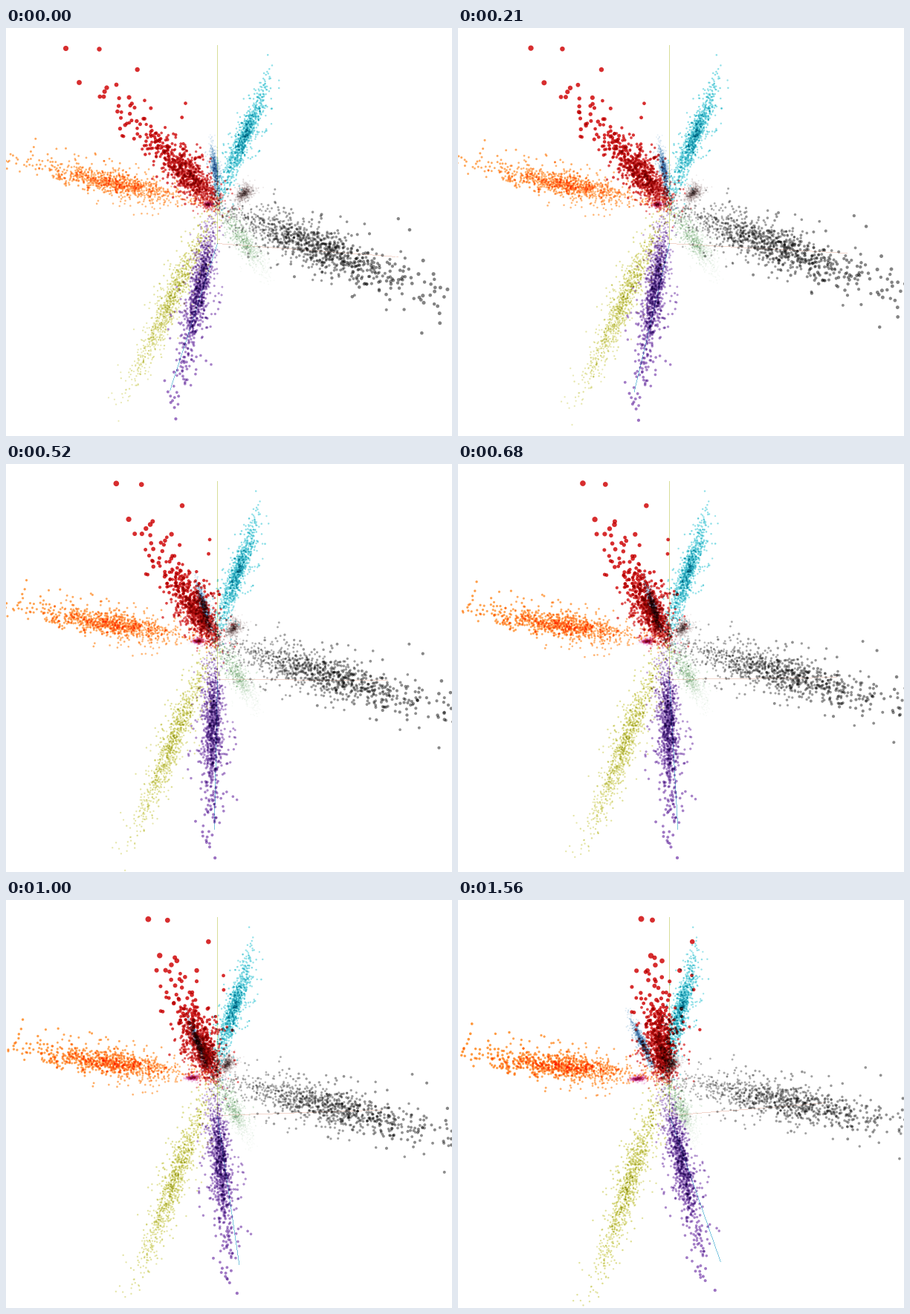
Animation, 600 px wide and 550 px high, one loop 1.59 s. Source, as a matplotlib script:

```python
import numpy as np
import matplotlib.pyplot as plt
from matplotlib.animation import FuncAnimation
from matplotlib.colors import to_rgb

W, H = 600, 550
LOOP, TICK = 1590, 10
ORIGIN = 284, 290
FOCAL, DIST = 437, 1.915
TILT = np.radians(28.7)

# turntable angle at a few times, and the bursts in which it is sampled
KEY_MS = [0, 210, 360, 680, 1000, 1260, 1560]
KEY_DEG = [-8.8, -6.5, -2.7, 1.55, 4.0, 5.4, 9.5]
BURSTS = [(0, 390, 14), (430, 520, 3), (590, 710, 5), (760, 950, 5),
          (1000, 1060, 3), (1130, 1260, 4), (1560, 1560, 1)]
STEPS = np.concatenate([np.linspace(*b) for b in BURSTS])

# A place is (x, y) at the first angle and x at the last angle.
HUB = (283, 238, 277)

# arms from the hub: colour, tip, densest part of the arm, width
ARMS = [("tab:cyan", (350, 75, 318), 0.55, 0.020),
        ("tab:olive", (170, 475, 189), 0.52, 0.028),
        ("tab:orange", (60, 190, 44), 0.64, 0.027),
        ("tab:gray", (575, 360, 606), 0.56, 0.035),
        ("tab:purple", (242, 440, 318), 0.62, 0.021),
        ("tab:red", (160, 106, 265), 0.42, 0.027)]

# small clusters far behind: colour, both ends, width
CLUMPS = [("#73ad73", (290, 245, 282), (350, 330, 318), 0.026),
          ("tab:blue", (285, 225, 263), (276, 155, 231), 0.011),
          ("#8c7373", (312, 230, 284), (328, 214, 291), 0.018),
          ("tab:pink", (276, 237, 253), (266, 237, 229), 0.007)]

# the few large dots closest to the viewer
NEAR_DOTS = [(80, 27, 246), (125, 28, 261), (98, 73, 259),
             (135, 80, 274), (148, 76, 264), (241, 101, 314)]

AXIS_COLORS = ["#f2d6cc", "#d8de99", "#7ac4de"]


def view(deg):
    """Rows: right, up and towards the viewer."""
    a = np.radians(deg)
    ca, sa, ct, st = np.cos(a), np.sin(a), np.cos(TILT), np.sin(TILT)
    return np.array([[ca, 0, sa],
                     [sa * st, ct, -ca * st],
                     [-sa * ct, st, ca * ct]])


def project(points, deg):
    right, up, near = view(deg) @ points.T
    depth = DIST - near
    return (ORIGIN[0] + FOCAL * right / depth,
            ORIGIN[1] - FOCAL * up / depth, depth)


def lift(place):
    """Find the 3D point seen at a place."""
    x0, y0, x1 = place
    first, last = view(KEY_DEG[0]), view(KEY_DEG[-1])
    rows, rhs = [], []
    for m, axis, shift in ((first, 0, x0 - ORIGIN[0]),
                           (first, 1, ORIGIN[1] - y0),
                           (last, 0, x1 - ORIGIN[0])):
        rows.append(FOCAL * m[axis] + shift * m[2])
        rhs.append(shift * DIST)
    return np.linalg.solve(rows, rhs)


def streak(rng, start, end, mid, width, n):
    """Random points along a line, with a few far from it."""
    a, b = lift(start), lift(end)
    t = np.clip(np.abs(mid + 0.2 * rng.standard_t(6, n)), 0, 1.2)
    t[t == 1.2] = rng.uniform(0, 1, np.sum(t == 1.2))
    noise = np.clip(rng.standard_t(3.5, (n, 3)), -5, 5)
    return a + t[:, None] * (b - a) + width * noise


def build_cloud():
    rng = np.random.default_rng(12)
    groups = [(c, streak(rng, a, b, 0.5, w, 650)) for c, a, b, w in CLUMPS]
    groups += [(c, streak(rng, HUB, tip, mid, w, 950))
               for c, tip, mid, w in ARMS]
    groups.append(("tab:red", np.array([lift(p) for p in NEAR_DOTS])))
    colors = [np.tile(to_rgb(c), (len(p), 1)) for c, p in groups]
    return np.vstack([p for _, p in groups]), np.vstack(colors)


POINTS, COLORS = build_cloud()
OY, OX = (g.ravel() for g in np.mgrid[-4:5, -4:5])


def draw_axes(img, deg):
    for end, color in zip(np.eye(3), AXIS_COLORS):
        x, y, _ = project(np.array([np.zeros(3), end]), deg)
        n = int(max(np.ptp(x), np.ptp(y))) + 1
        px = np.rint(np.linspace(*x, n)).astype(int)
        py = np.rint(np.linspace(*y, n)).astype(int)
        img[py, px] *= to_rgb(color)


def render(deg):
    """Blend all dots by multiplication, fading with distance."""
    x, y, depth = project(POINTS, deg)
    radius = np.minimum(2.45 / depth ** 1.15, 3.9)
    alpha = np.clip((2.6 - depth) / 1.55, 0.06, 0.97)

    px = np.rint(x).astype(int)[:, None] + OX
    py = np.rint(y).astype(int)[:, None] + OY
    gap = np.hypot(px - x[:, None], py - y[:, None])
    cover = np.clip(radius[:, None] + 0.5 - gap, 0, 1)
    keep = (cover > 0) & (px >= 0) & (px < W) & (py >= 0) & (py < H)
    cell = (py * W + px)[keep]
    amount = (cover * alpha[:, None])[keep]
    owner = np.nonzero(keep)[0]

    img = np.ones((H, W, 3))
    draw_axes(img, deg)
    for ch in range(3):
        shade = np.log(1 - amount * (1 - COLORS[owner, ch]))
        total = np.bincount(cell, weights=shade, minlength=W * H)
        img[..., ch] *= np.exp(total).reshape(H, W)
    return np.rint(img * 255).astype(np.uint8)


POSES = [render(d) for d in np.interp(STEPS, KEY_MS, KEY_DEG)]

fig = plt.figure(figsize=(W / 100, H / 100), dpi=100, facecolor="white")
ax = fig.add_axes([0, 0, 1, 1])
ax.axis("off")
picture = ax.imshow(POSES[0], interpolation="nearest", aspect="auto")


def update(frame):
    pose = np.searchsorted(STEPS, frame * TICK, side="right") - 1
    picture.set_data(POSES[pose])
    return [picture]


anim = FuncAnimation(fig, update, frames=LOOP // TICK, interval=TICK,
                     repeat=True, repeat_delay=0)
plt.show()
```
